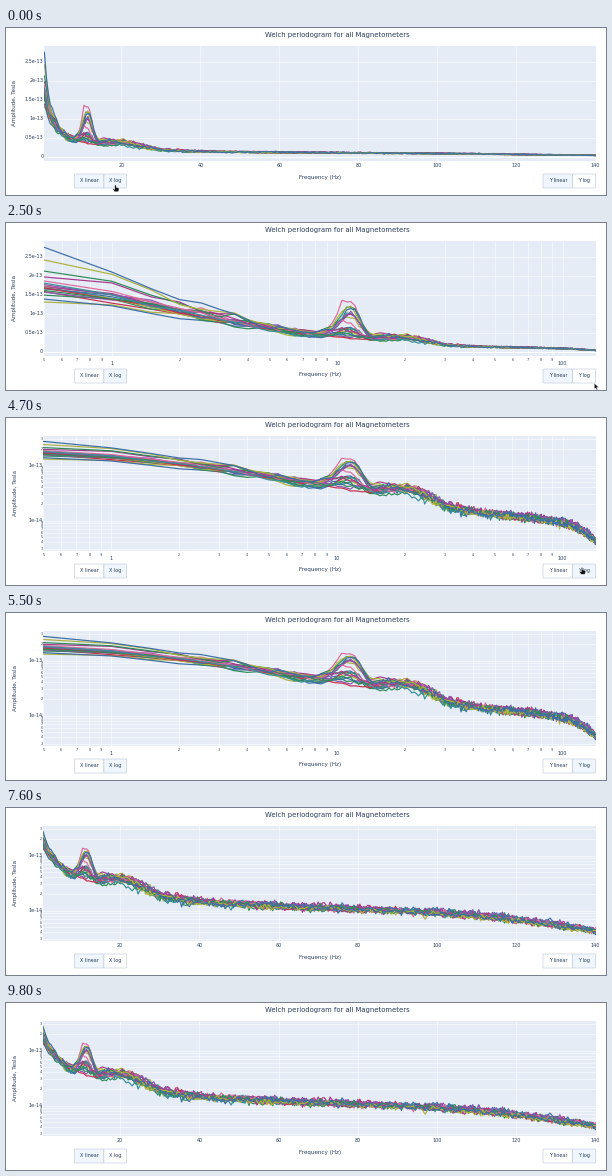
Recreate the animation shown at these times as a matplotlib script. Size 600 px wide and 167 px high, loop 9.9 s.

```python
import matplotlib.pyplot as plt
import numpy as np
from matplotlib.animation import FuncAnimation
from matplotlib.patches import FancyBboxPatch, Polygon, Rectangle

W, H, DPI = 600, 167, 100
STEP, LOOP = 100, 9900
PT = 72 / DPI
INK, PANEL, BORDER, LIT = "#2a3f5f", "#e5ecf6", "#bec8d9", "#f0f6fd"
TOP, BOTTOM, RIGHT = 18.3, 133, 589.5
F_MIN, F_MAX = 0.5, 140
TITLE, AXIS, TICK, MINOR = 6.84, 5.6, 4.83, 3.4

X_LOG_AT, Y_LOG_AT, X_LINEAR_AT = 900, 4600, 7000

plt.rcParams["font.family"] = "DejaVu Sans"
fig = plt.figure(figsize=(W / DPI, H / DPI), dpi=DPI, facecolor="white")


def layer(z):
    ax = fig.add_axes([0, 0, 1, 1], zorder=z)
    ax.set_xlim(0, W)
    ax.set_ylim(H, 0)
    ax.axis("off")
    return ax


def label(ax, x, y, text, size, **kw):
    opts = dict(ha="center", va="center", color=INK) | kw
    return ax.text(x, y, text, fontsize=size * PT, **opts)


# Spectra, in units of 1e-13 T
PALETTE = ["#adb23f", "#3c6ea5", "#c9304c", "#2e8b57", "#8c55ab",
           "#dd6a9c", "#3a8f98", "#a8388a", "#2e8b57"]
TRACES = 20


def bump(f, center, width):
    return np.exp(-((f - center) / width) ** 2)


def make_spectra():
    """Falling background, alpha and beta bumps, and a low-passed floor."""
    rng = np.random.default_rng(12)
    f = np.arange(F_MIN, F_MAX + .1, .5)
    lf = np.log10(f)
    falling = 1.95 / (1 + (f / 2.2) ** 1.1) + .15 * bump(f, 20, 7)
    floor = .07 / (1 + (f / 128) ** 8)
    alpha = .36 * bump(f, 11.4, np.where(f < 11.4, 1.9, 1.6))
    jitter = .012 + .016 * np.minimum(f / 25, 1)
    mid_band = f / (f + 3) / (1 + (f / 40) ** 2)

    curves = []
    for k, u in enumerate(np.linspace(-1, 1, TRACES)):
        rank = (17 * k + 13) % TRACES / (TRACES - 1)
        gain = .1 + 2.2 * rank ** 1.3
        amp = falling + floor * rng.uniform(.88, 1.15) + alpha * gain
        start = .16 * u ** 3 + .05 * u ** 2
        level = np.log10(amp) + start / (1 + (f / 2.5) ** 2)
        level += mid_band * rng.normal(0, .06)
        for cycles in (1.5, 3, 6):
            phase = rng.uniform(0, 2 * np.pi)
            wave = np.sin(2 * np.pi * cycles * lf + phase)
            level += .03 * mid_band * wave
        level += rng.normal(0, 1, len(f)) * jitter
        curves.append((PALETTE[k % len(PALETTE)], level))
    return f, curves


FREQ, CURVES = make_spectra()


def log_ticks(lo, hi):
    """Yield (exponent, digit, log10 value) inside the range."""
    for e in range(int(np.floor(lo)), int(np.ceil(hi)) + 1):
        for d in range(1, 10):
            v = e + np.log10(d)
            if lo - 1e-9 <= v <= hi:
                yield e, d, v


def draw_chart(x_log, y_log, left):
    ax = layer(1)
    panel = Rectangle((left, TOP), RIGHT - left, BOTTOM - TOP, fc=PANEL, lw=0)
    ax.add_patch(panel)

    def px(f):
        scale = np.log10 if x_log else np.asarray
        lo, hi = scale(F_MIN), scale(F_MAX)
        return left + (scale(f) - lo) / (hi - lo) * (RIGHT - left)

    def py(level):
        return 47.5 - 55 * level if y_log else 129 - 38.2 * 10 ** level

    def v_grid(x):
        ax.plot([x, x], [TOP, BOTTOM], color="white", lw=.5 * PT)

    def h_grid(y, width=.5):
        ax.plot([left, RIGHT], [y, y], color="white", lw=width * PT)

    def y_tick(y, text, size=TICK):
        label(ax, left - .8, y, text, size, ha="right")

    if x_log:
        for e, d, v in log_ticks(np.log10(F_MIN), np.log10(F_MAX)):
            x = px(10 ** v)
            v_grid(x)
            if d == 1:
                label(ax, x, 140.2, str(10 ** e), TICK)
            else:
                label(ax, x, 136.8, str(d), MINOR)
    else:
        for f in range(20, 141, 20):
            v_grid(px(f))
            label(ax, px(f), 137.3, str(f), TICK)

    if y_log:
        for e, d, v in log_ticks(-1.54, .53):
            h_grid(py(v))
            if d == 1:
                y_tick(py(v), f"1e-{13 - e}")
            else:
                y_tick(py(v), str(d), MINOR)
    else:
        for k in range(6):
            y = 129 - 19.1 * k
            h_grid(y, .5 if k else 1)
            y_tick(y, f"{k / 2:g}e-13" if k else "0")

    for color, level in CURVES:
        line, = ax.plot(px(FREQ), py(level), color=color, lw=1.2 * PT,
                        solid_joinstyle="round")
        line.set_clip_path(panel)

    label(ax, 331.5, 6.5, "Welch periodogram for all Magnetometers", TITLE)
    label(ax, 314, 152 if x_log else 149.3, "Frequency (Hz)", AXIS)
    label(ax, 9.8 if y_log else 8.8, 75.5, "Amplitude, Tesla", AXIS,
          rotation=90)
    return ax


charts = {
    (False, False): draw_chart(False, False, 38.4),
    (True, False): draw_chart(True, False, 38),
    (True, True): draw_chart(True, True, 37.3),
    (False, True): draw_chart(False, True, 37),
}

# Buttons: name -> (x, width)
BTN_Y, BTN_H = 146, 14
BUTTONS = {"X linear": (68.3, 29.6), "X log": (97.9, 22.8),
           "Y linear": (537, 29.6), "Y log": (566.6, 22.9)}
top = layer(2)
boxes = {}
for name, (bx, bw) in BUTTONS.items():
    boxes[name] = top.add_patch(FancyBboxPatch(
        (bx, BTN_Y), bw, BTN_H, boxstyle="round,pad=0,rounding_size=.8",
        ec=BORDER, fc="white", lw=.6 * PT))
    label(top, bx + bw / 2, BTN_Y + 6.8, name, TICK)

# Pointer shapes, relative to the hot spot
ARROW = np.array([(0, 0), (0, 6.2), (1.5, 4.9), (2.6, 7), (3.6, 6.5),
                  (2.6, 4.5), (4.6, 4.4)])
HAND = np.array([(-.7, 0), (.6, 0), (.7, 2.3), (3.4, 3), (3.5, 5), (2.8, 6.8),
                 (-1, 6.8), (-2.7, 4.2), (-2.2, 3.6), (-.8, 4.4)])
pointer = top.add_patch(Polygon(ARROW, fc="#111111", ec="white", lw=.4 * PT,
                                zorder=9))

# Where the pointer rests: from ms, to ms, x, y
VISITS = [(0, 500, 109.5, 157), (600, 1900, 108.5, 154),
          (2400, 3300, 588.2, 160), (4300, 4900, 576, 149.5),
          (5800, 7000, 81, 154)]
SLIDE = 300


def pointer_at(t):
    """Rest at the nearest visit, or slide to and from below the stage."""
    gap, x, y = min((max(a - t, t - b, 0), x, y) for a, b, x, y in VISITS)
    return x, y + 26 * min(gap / SLIDE, 1) ** 2


def button_at(x, y):
    for name, (bx, bw) in BUTTONS.items():
        if bx <= x <= bx + bw and BTN_Y <= y < BTN_Y + BTN_H:
            return name


def update(i):
    t = i * STEP
    x_log = X_LOG_AT <= t < X_LINEAR_AT
    y_log = t >= Y_LOG_AT
    for key, ax in charts.items():
        ax.set_visible(key == (x_log, y_log))

    x, y = pointer_at(t)
    hover = button_at(x, y)
    pointer.set_xy((HAND if hover else ARROW) + (x, y))

    lit = {"X log" if x_log else "X linear",
           "Y log" if y_log else "Y linear", hover}
    for name, box in boxes.items():
        box.set_facecolor(LIT if name in lit else "white")
    return []


anim = FuncAnimation(fig, update, frames=LOOP // STEP, interval=STEP,
                     repeat=True, repeat_delay=0, blit=False)
plt.show()
```
